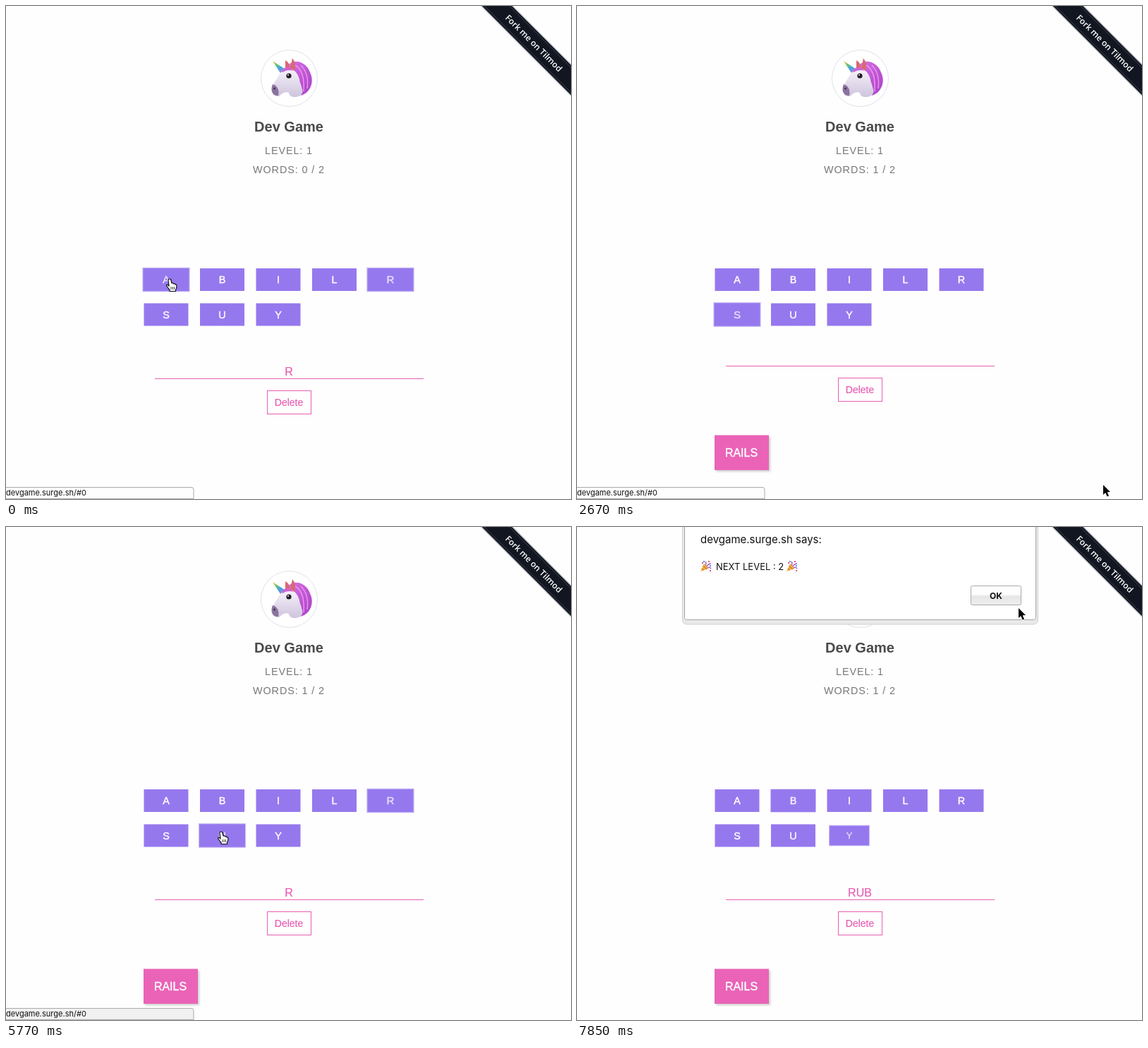
An HTML page for the animation above (8 s loop, 801 px wide and 699 px high).

```html
<!DOCTYPE html>
<html lang="en">
<head>
<meta charset="utf-8">
<title>Dev Game</title>
<style>
  html, body { margin: 0; width: 100%; height: 100%; overflow: hidden; background: #fefefe; }
  svg { display: block; width: 100%; height: 100%; }
  text { font-family: "Liberation Sans", Arial, sans-serif; }
  .mid { text-anchor: middle; }
  .info { font-size: 14.4px; letter-spacing: .9px; fill: #777; }
  .pink { fill: #e75fb3; stroke: #e75fb3; stroke-width: .2px; }
  .white { fill: #fff; stroke: #fff; stroke-width: .4px; }
  .ui { font-family: Inter, sans-serif; fill: #111; }
</style>
</head>
<body>
<svg viewBox="0 0 801 699">
  <defs>
    <linearGradient id="horn" x1="0" y1="0" x2="1" y2="1">
      <stop offset="0" stop-color="#f2c230"/><stop offset=".3" stop-color="#72c765"/>
      <stop offset=".6" stop-color="#3fa5e8"/><stop offset="1" stop-color="#e66fb4"/>
    </linearGradient>
    <linearGradient id="mane" x1="0" y1="0" x2="1" y2="1">
      <stop offset="0" stop-color="#dc72e4"/><stop offset="1" stop-color="#a83fc8"/>
    </linearGradient>
    <linearGradient id="face" x1="0" y1="0" x2="0" y2="1">
      <stop offset="0" stop-color="#f6f3fa"/><stop offset="1" stop-color="#cfc4dd"/>
    </linearGradient>
    <linearGradient id="okFill" x1="0" y1="0" x2="0" y2="1">
      <stop offset=".45" stop-color="#fdfdfd"/><stop offset=".55" stop-color="#e6e6e6"/><stop offset="1" stop-color="#eee"/>
    </linearGradient>
    <filter id="soft" x="-20%" y="-20%" width="150%" height="150%"><feGaussianBlur stdDeviation="1.8"/></filter>
    <g id="popper">
      <path d="M0 15 5 4Q10 6 11 11Z" fill="#efb23c"/>
      <path d="M2 11 5 13M4 7 9 12" stroke="#d9783d" stroke-width="1.4"/>
      <path d="M7 6Q9 4 7 1M9 8Q11 4 15 4M10 10Q13 8 15 11" fill="none" stroke="#a45bc8" stroke-width="1.4"/>
      <path d="M2 2h2v2H2zM11 0h2v2h-2zM13 13h2v2h-2z" fill="#e4577a"/>
      <path d="M4 0h2v2H4zM13 6h2v2h-2z" fill="#4c9de0"/>
    </g>
  </defs>

  <rect width="801" height="699" fill="#fefefe"/>

  <circle cx="401.5" cy="102.5" r="40" fill="#fff" stroke="#dfe2ea"/>
  <g id="unicorn">
    <path d="M397 87C407 72 426 79 431 94C438 108 431 123 418 127C422 112 415 98 397 92Z" fill="url(#mane)"/>
    <path d="M410 84Q424 92 422 121M418 84Q430 96 427 117" fill="none" stroke="#ea94ee" stroke-width="1.5"/>
    <path d="M396 91 396 77Q403 80 402 90ZM403 89 406 74Q412 81 409 92Z" fill="#d9696e"/>
    <path d="M392 91C402 85 413 91 416 104C417 115 425 121 417 127C410 131 401 129 401 123C395 121 391 124 387 128C380 129 375 123 377 114C382 107 386 98 392 91Z" fill="url(#face)"/>
    <path d="M378 111C384 112 388 119 386 127C379 128 374 121 378 111Z" fill="#8b739f"/>
    <circle cx="380.5" cy="117" r="1.5" fill="#44344f"/>
    <path d="M390 91Q398 83 408 92Q399 89 392 94Z" fill="#cf61dc"/>
    <path d="M378 78 395 89 389 95Z" fill="url(#horn)"/>
    <circle cx="401" cy="99" r="3.6" fill="#201a26"/><circle cx="400" cy="97.8" r="1" fill="#fff"/>
  </g>

  <text class="mid" x="401" y="178" font-size="20" font-weight="700" fill="#4a4a4a">Dev Game</text>
  <text class="mid info" x="401" y="210">LEVEL: 1</text>
  <text class="mid info" x="401" y="237" id="count"></text>

  <g id="keys"></g>

  <text class="mid pink" x="401" y="524" font-size="16" id="word"></text>
  <g id="lower">
    <path d="M211 528.5H592" stroke="#e75fb3"/>
    <rect x="370.5" y="545.5" width="62" height="33" fill="#fff" stroke="#e75fb3"/>
    <text class="mid pink" x="401" y="567" font-size="14">Delete</text>
    <g id="found">
      <rect x="197" y="629" width="77" height="49" fill="#999" opacity=".5" filter="url(#soft)"/>
      <rect x="195" y="626.5" width="77" height="49.5" fill="#ea63b7"/>
      <text class="mid white" x="233" y="656.5" font-size="16">RAILS</text>
    </g>
  </g>

  <g transform="translate(748.5 52.5) rotate(45)">
    <path d="M-120 0H120" stroke="#c8cace" stroke-width="33"/>
    <path d="M-120 0H120" stroke="#121621" stroke-width="30"/>
    <path d="M-120-12.5H120M-120 12.5H120" stroke="#5d626d" stroke-width=".8" stroke-dasharray="2 1"/>
    <text class="mid" y="4.5" font-size="12" font-weight="600" fill="#fff" style="font-family:'Open Sans',sans-serif">Fork me on Tilmod</text>
  </g>

  <g id="status">
    <path id="statusBar" d="M-1 682.5H263Q266 682.5 266 685.5V698.5H-1Z" stroke="#aaa"/>
    <text class="ui" x="0" y="694" font-size="11">devgame.surge.sh/#0</text>
  </g>

  <g id="dialog">
    <rect x="149.5" y="-30" width="504" height="168" rx="6" fill="#e9e9e9" stroke="#d0d0d0"/>
    <rect x="152.5" y="-30" width="498" height="161.5" rx="3" fill="#fff" stroke="#a5a5a5"/>
    <text class="ui" x="175" y="23" font-size="15">devgame.surge.sh says:</text>
    <use href="#popper" x="175" y="48"/>
    <text class="ui" x="197" y="61" font-size="13">NEXT LEVEL : 2</text>
    <use href="#popper" x="297" y="48"/>
    <rect x="558.5" y="83.5" width="71" height="27" rx="2" fill="url(#okFill)" stroke="#aaa"/>
    <text class="ui mid" x="594" y="101.5" font-size="12" font-weight="700">OK</text>
  </g>

  <g id="cursor">
    <g id="ring" fill="none">
      <circle cx="1" cy="-1.5" r="9.5" stroke="#fff" stroke-width="3.5"/>
      <circle cx="1" cy="-1.5" r="9.8" stroke="#222" stroke-width="1.3"/>
    </g>
    <g id="hand" stroke="#111" stroke-linejoin="round">
      <path d="M-2 1Q-2-1 0-1T2 1L3 5Q5 4 5.5 6Q7.5 5 8 7Q10 6.5 10 9Q10 12 8.5 14V16.5H0V14.5Q-3 11-4.5 8.5Q-4.5 6.5-2.5 7.5L-1 9Z" fill="#fff" stroke-width="1.2"/>
      <path d="M2 10V14M4.3 10V14M6.5 10V14" stroke-width=".8"/>
    </g>
    <path id="arrow" d="M0 0V14L3.2 11 5.6 16.5 8 15.5 5.7 10.3 10 10Z" stroke="#fff" stroke-width="1.4" paint-order="stroke"/>
  </g>
</svg>

<script>
const LOOP = 8000, STEP = 148, LAST_STEP = 53;
const ALERT_AT = 7400;
const HOVER = 1.05, PRESS = 0.9;
const $ = id => document.getElementById(id);
const show = (id, on) => { $(id).style.display = on ? '' : 'none'; };

// Scale changes per key: [start time, target scale]
const tracks = {
  A: [[-400, HOVER], [140, PRESS], [350, HOVER], [880, 1]],
  B: [[6150, HOVER], [6340, PRESS], [6420, HOVER], [7300, 1]],
  I: [[600, HOVER], [800, PRESS], [950, HOVER], [1290, 1], [4250, HOVER], [4590, 1]],
  L: [[1150, HOVER], [1300, PRESS], [1520, HOVER], [2060, 1], [4680, HOVER], [4850, 1]],
  R: [[-400, HOVER], [140, 1], [4850, HOVER], [5100, PRESS], [5300, HOVER], [5900, 1]],
  S: [[1850, HOVER], [2060, PRESS], [2220, HOVER], [5100, 1]],
  U: [[5450, HOVER], [5900, PRESS], [6030, HOVER], [6340, 1]],
  Y: [[4100, HOVER], [4250, 1], [7000, HOVER], [7150, PRESS]]
};
const words = [[0, 'R'], [300, 'RA'], [950, 'RAI'], [1520, 'RAIL'], [2220, ''],
  [5300, 'R'], [6030, 'RU'], [6420, 'RUB']];
const path = [
  [0, 232, 388], [300, 232, 388], [740, 385, 391], [980, 385, 391], [1300, 464, 392],
  [1560, 464, 392], [2000, 228, 448], [2370, 228, 448], [2664, 746, 679], [2900, 754, 683],
  [3560, 300, 620], [4000, 372, 500], [4144, 385, 445], [4292, 386, 400], [4440, 392, 396],
  [4588, 423, 398], [4736, 521, 392], [4950, 543, 390], [5300, 543, 390], [5600, 305, 433],
  [6050, 305, 433], [6250, 305, 400], [6660, 305, 400], [7000, 384, 432], [7400, 384, 434],
  [7844, 626, 115]
];

const clamp = v => Math.min(1, Math.max(0, v));
const easeOut = p => 1 - (1 - p) ** 3;
const smooth = p => p * p * (3 - 2 * p);

const keys = Object.keys(tracks).map((letter, i) => {
  const x = 227 + 79.5 * (i % 5), y = i < 5 ? 388 : 437.5;
  $('keys').insertAdjacentHTML('beforeend', `<g>
    <rect x="-31.5" y="-16" width="63" height="32" fill="#9678ee" stroke="#c9bcf5"/>
    <text class="mid white" y="5" font-size="14.4">${letter}</text></g>`);
  return { x, y, track: tracks[letter], node: $('keys').lastChild };
});

function scaleAt(track, t) {
  return track.reduce((s, [at, to]) => s + (to - s) * easeOut(clamp((t - at) / 300)), 1);
}

function cursorAt(t) {
  const next = path.findIndex(p => p[0] > t);
  if (next < 0) return path.at(-1).slice(1);
  const [t0, x0, y0] = path[next - 1], [t1, x1, y1] = path[next];
  const p = smooth((t - t0) / (t1 - t0));
  return [x0 + (x1 - x0) * p, y0 + (y1 - y0) * p];
}

function render(t) {
  const pageTime = Math.min(t, ALERT_AT); // the alert freezes the page
  let pressed = false;
  for (const { x, y, track, node } of keys) {
    const scale = scaleAt(track, pageTime);
    const lift = clamp(Math.abs(scale - 1) / 0.05);
    node.setAttribute('transform', `translate(${x} ${y}) scale(${scale})`);
    node.children[0].setAttribute('stroke-opacity', lift);
    node.children[1].setAttribute('opacity', 1 - 0.25 * lift);
    pressed ||= track.filter(([at]) => at <= t).at(-1)?.[1] === PRESS;
  }

  const word = words.filter(([at]) => at <= t).at(-1)[1];
  const solved = t >= 2220;
  $('word').textContent = word;
  $('count').textContent = `WORDS: ${+solved} / 2`;
  $('lower').setAttribute('transform', `translate(0 ${word ? 0 : -18})`);
  show('found', solved);

  const returned = t >= 4140, alerting = t >= ALERT_AT;
  $('status').setAttribute('opacity', returned ? +!alerting : 1 - clamp((t - 2700) / 300));
  $('statusBar').setAttribute('fill', returned ? '#f1f1f1' : '#fdfdfd');

  show('dialog', alerting);
  $('dialog').setAttribute('transform', `translate(0 ${-140 * (1 - easeOut(clamp((t - ALERT_AT) / 280)))})`);

  const [cx, cy] = cursorAt(t);
  const onKey = !alerting && keys.some(k => Math.abs(cx - k.x) < 32 && Math.abs(cy - k.y) < 17);
  $('cursor').setAttribute('transform', `translate(${cx} ${cy})`);
  show('hand', onKey);
  show('arrow', !onKey);
  show('ring', pressed && !alerting);
}

const start = performance.now();
function tick(now) {
  const elapsed = Math.max(0, now - start) % LOOP;
  render(Math.min(LAST_STEP, Math.floor(elapsed / STEP)) * STEP);
  requestAnimationFrame(tick);
}
render(0);
requestAnimationFrame(tick);
</script>
</body>
</html>
```
